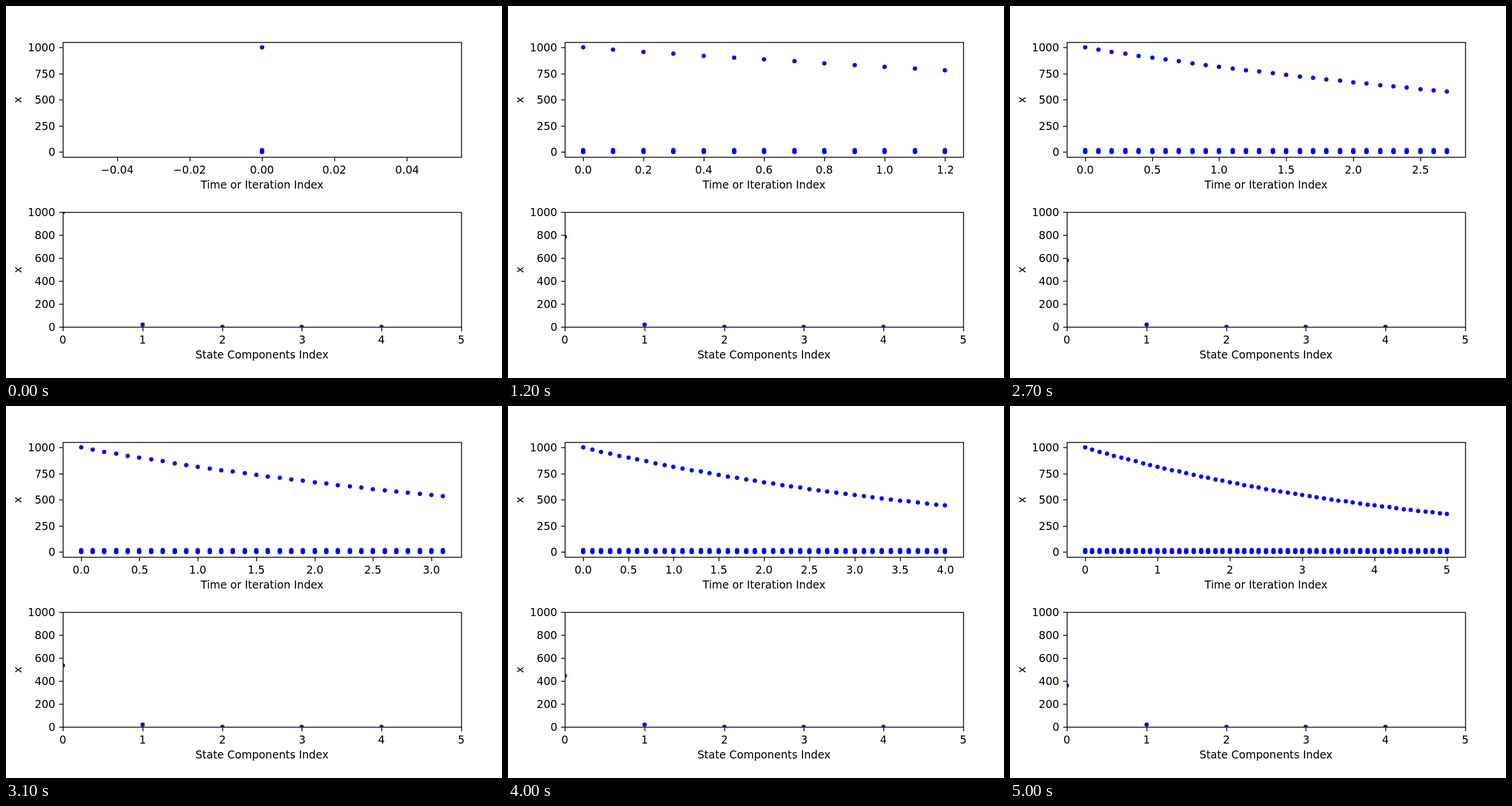
An HTML page with a canvas for the animation above (5.1 s loop, 864 by 648 pixels).

```html
<!DOCTYPE html>
<html lang="en">
<head>
<meta charset="utf-8">
<title>State over time</title>
<style>
html, body { margin: 0; height: 100%; overflow: hidden; background: #fff; }
canvas { display: block; }
</style>
</head>
<body>
<canvas id="stage" width="864" height="648"></canvas>
<script>
const ctx = document.getElementById('stage').getContext('2d');
const LEFT = 99.2, WIDTH = 693.8, HEIGHT = 200;
const TOP_AXES = 63.4, BOTTOM_AXES = 359.4;
const FRAME_MS = 100, FRAMES = 51;

const snap = v => Math.round(v) + 0.5;
const scale = (lo, hi, from, to) => v => from + (v - lo) / (hi - lo) * (to - from);
const range = (n, step = 1) => Array.from({ length: n }, (_, i) => i * step);

// Step i of the Euler-integrated state.
const state = i => [1000 * 0.98 ** i, 20, 0, 0, 0];

function line(x1, y1, x2, y2) {
  ctx.beginPath();
  ctx.moveTo(x1, y1);
  ctx.lineTo(x2, y2);
  ctx.stroke();
}

function dot(x, y) {
  ctx.beginPath();
  ctx.arc(Math.round(x), Math.round(y), 3.75, 0, 2 * Math.PI);
  ctx.fill();
}

// align: 0 = left, 0.5 = centre, 1 = right
function text(str, x, y, align) {
  ctx.fillText(str, Math.round(x - ctx.measureText(str).width * align), Math.round(y));
}

// Smallest "nice" step giving at most nine intervals.
function tickStep(span) {
  const raw = span / 9, power = 10 ** Math.floor(Math.log10(raw));
  const nice = [1, 2, 2.5, 5, 10].find(s => s * power >= raw * (1 - 1e-9));
  return nice * power;
}

function timeTicks(lo, hi) {
  const step = tickStep(hi - lo);
  let decimals = 0;
  while (Math.abs(step - step.toFixed(decimals)) > step * 1e-6) decimals++;
  const ticks = [];
  for (let k = Math.ceil(lo / step); k * step <= hi; k++) {
    ticks.push([k * step, (k * step).toFixed(decimals).replace('-', '\u2212')]);
  }
  return ticks;
}

function drawAxes({ top, x, y, xTicks, yTicks, label, points }) {
  const bottom = top + HEIGHT, l = snap(LEFT), b = snap(bottom);

  ctx.save();
  ctx.beginPath();
  ctx.rect(Math.round(LEFT), Math.round(top), Math.round(WIDTH), HEIGHT);
  ctx.clip();
  ctx.fillStyle = '#00f';
  for (const [px, py] of points) dot(x(px), y(py));
  ctx.restore();

  for (const [v, str] of xTicks) {
    line(snap(x(v)), b, snap(x(v)), b + 7);
    text(str, x(v), bottom + 28.6, 0.5);
  }
  for (const v of yTicks) {
    line(l, snap(y(v)), l - 7, snap(y(v)));
    text(String(v), LEFT - 13.1, y(v) + 7, 1);
  }
  ctx.strokeRect(l, snap(top), snap(LEFT + WIDTH) - l, HEIGHT);

  text(label, LEFT + WIDTH / 2, bottom + 54.6, 0.5);
  ctx.save();
  ctx.translate(27, Math.round(top + HEIGHT / 2));
  ctx.rotate(-Math.PI / 2);
  text('x', 0, 0, 0.5);
  ctx.restore();
}

function draw(n) {
  ctx.fillStyle = '#fff';
  ctx.fillRect(0, 0, 864, 648);
  ctx.fillStyle = ctx.strokeStyle = '#000';
  ctx.lineWidth = 1.5;
  ctx.font = '18.75px "DejaVu Sans", sans-serif';

  const time = n / 10;
  const lo = n ? -0.05 * time : -0.055, hi = n ? 1.05 * time : 0.055;
  drawAxes({
    top: TOP_AXES,
    x: scale(lo, hi, LEFT, LEFT + WIDTH),
    y: scale(-50, 1050, TOP_AXES + HEIGHT, TOP_AXES),
    xTicks: timeTicks(lo, hi),
    yTicks: range(5, 250),
    label: 'Time or Iteration Index',
    points: range(n + 1).flatMap(i => state(i).map(v => [i / 10, v]))
  });
  drawAxes({
    top: BOTTOM_AXES,
    x: scale(0, 5, LEFT, LEFT + WIDTH),
    y: scale(0, 1000, BOTTOM_AXES + HEIGHT, BOTTOM_AXES),
    xTicks: range(6).map(v => [v, String(v)]),
    yTicks: range(6, 200),
    label: 'State Components Index',
    points: state(n).map((v, i) => [i, v])
  });
}

const start = performance.now();
function tick() {
  const elapsed = Math.max(0, performance.now() - start);
  draw(Math.floor(elapsed / FRAME_MS) % FRAMES);
  requestAnimationFrame(tick);
}
tick();
</script>
</body>
</html>
```
